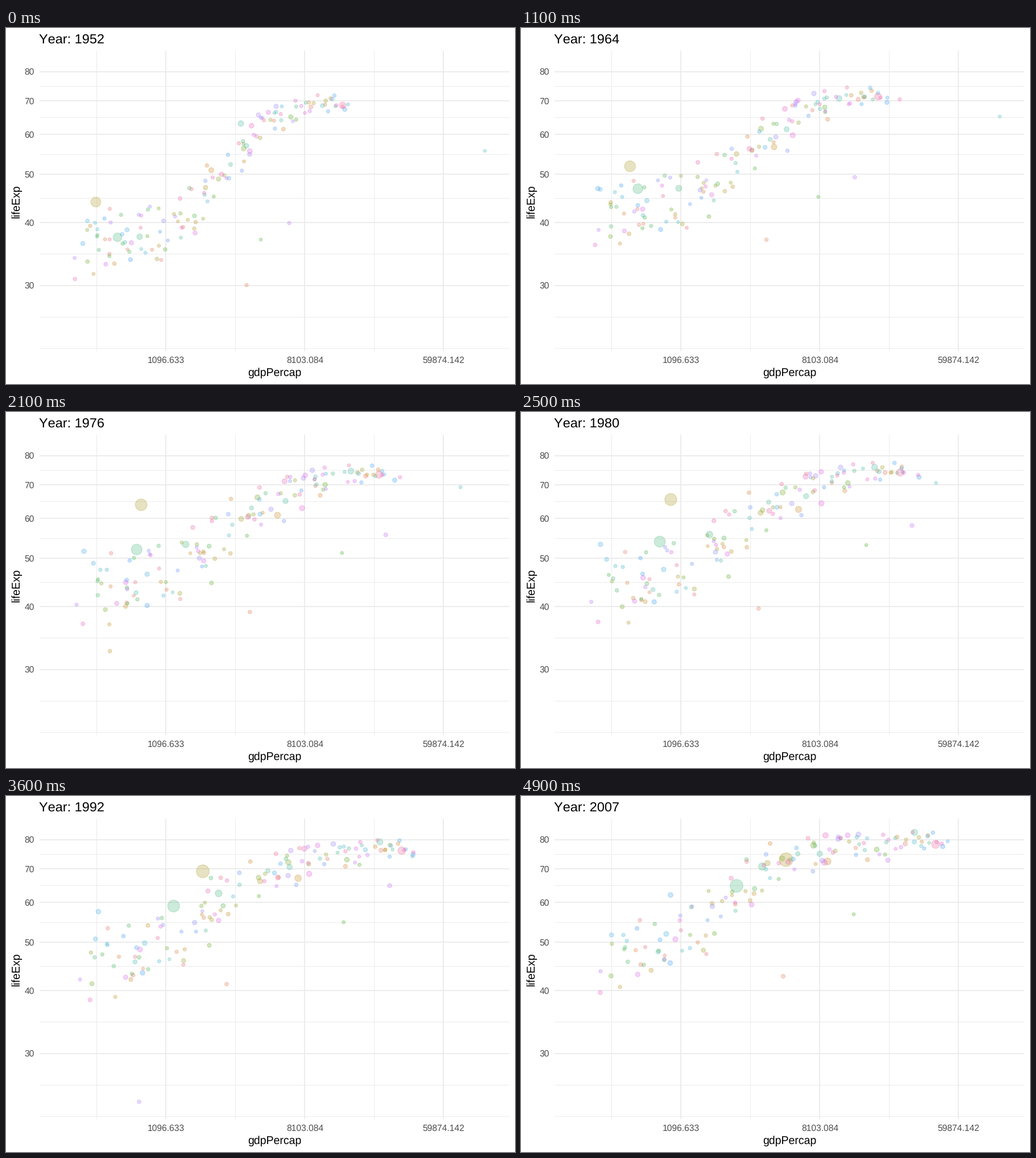
A matplotlib script for the animation above (5 s loop, 895 by 626 pixels).

```python
import numpy as np
import matplotlib.pyplot as plt
from matplotlib.animation import FuncAnimation

W, H, DPI = 895, 626, 128
FRAMES, INTERVAL = 50, 100
COUNTRIES = 142
MAX_POP = 1318.7  # millions

plt.rcParams.update({
    "font.family": "Liberation Sans",
    "text.hinting": "none",
    "text.kerning_factor": 6,
})
rng = np.random.default_rng(2007)

# Twelve surveys; the dots move linearly from one to the next
SURVEYS = np.round(np.linspace(0, FRAMES - 1, 12))
T = SURVEYS / (FRAMES - 1)


def tween(values):
    return np.interp(np.arange(FRAMES), SURVEYS, values)


def lerp(a, b, t):
    return a + (b - a) * t


def hcl(hue, chroma=100, light=65):
    """Polar LUV colour, as shown on a wide-gamut screen."""
    u = chroma * np.cos(np.radians(hue)) / (13 * light) + 0.19784
    v = chroma * np.sin(np.radians(hue)) / (13 * light) + 0.46834
    y = ((light + 16) / 116) ** 3
    x = 9 * y * u / (4 * v)
    z = 3 * y / v - 5 * y - x / 3
    r, g, b = np.clip([
        3.2405 * x - 1.5371 * y - 0.4985 * z,
        -0.9693 * x + 1.8760 * y + 0.0416 * z,
        0.0556 * x - 0.2040 * y + 1.0572 * z,
    ], 0, 1)
    wide = np.array([0.82 * r + 0.18 * g,
                     0.03 * r + 0.97 * g,
                     0.02 * r + 0.07 * g + 0.91 * b])
    return np.clip(1.055 * wide ** (1 / 2.4) - 0.055, 0, 1)


def marker_area(pop):
    size = 1 + 5 * np.sqrt(np.clip(pop / MAX_POP, 0, 1))
    return (0.75 * (2.845 * size + 0.945)) ** 2


dots = {}  # alphabetical rank -> (x, y, marker area) over all frames


def add_dot(rank, x, y, pops):
    dots[rank] = tween(x), tween(y), tween(marker_area(lerp(*pops, T)))


def journey(rank, pops, start, end, bend=(1, 0.7), detour=(0, 1, 1, 0, 0)):
    """Eased path with an optional detour: peak, rise, fall, dx, dy."""
    peak, rise, fall, dx, dy = detour
    away = np.interp(SURVEYS, (peak - rise, peak, peak + fall), (0, 1, 0))
    add_dot(rank,
            lerp(start[0], end[0], T ** bend[0]) + dx * away,
            lerp(start[1], end[1], T ** bend[1]) + dy * away,
            pops)


# The largest populations
journey(24, (556, 1319), (158, 306), (466, 112), (1.6, 0.36), (9, 9, 4, 10, 100))
journey(58, (372, 1110), (196, 368), (379, 158), (2, 0.6))
journey(134, (157, 301), (592, 136), (729, 85), (0.9, 0.8))
journey(59, (82, 223), (235, 367), (424, 124))
journey(14, (56, 190), (361, 250), (539, 115), (0.5, 0.8))
journey(66, (86, 127), (413, 168), (692, 64), (0.43, 0.57))

# Countries that stray far from the crowd
journey(71, (0.2, 2.5), (842, 216), (741, 88), (4, 0.5), (27, 8, 30, -140, 0))
journey(106, (2.5, 9), (184, 342), (252, 287), detour=(36, 5, 4, 0, 240))
journey(18, (4.7, 14), (148, 348), (336, 189), (2, 0.9), (22, 9, 5, 0, 165))
journey(3, (4, 12), (423, 452), (461, 317), (1, 0.35), (36, 18, 13, -63, 0))
journey(45, (0.4, 1.5), (448, 372), (585, 208), detour=(25, 25, 20, 100, -40))
journey(109, (4, 28), (498, 343), (645, 113), detour=(25, 25, 24, 127, 0))
journey(84, (20, 48), (135, 379), (263, 174), (5, 0.5))


def strata(n, limit):
    """Shuffled, evenly spaced scores."""
    return rng.permutation(np.linspace(-limit, limit, n))


def sway(amount):
    """A small wandering that starts and ends at zero."""
    walk = np.cumsum(rng.normal(0, amount, T.size))
    return walk - lerp(walk[0], walk[-1], T)


def falloff(wealth, middle, steepness):
    return 1 / (1 + np.exp((wealth - middle) * steepness))


# The crowd: richer countries start higher, poorer ones climb further
crowd = rng.permutation([r for r in range(COUNTRIES) if r not in dots])
health = strata(crowd.size, 1.7)
for rank, wealth, luck in zip(crowd, np.linspace(0, 1, crowd.size), health):
    first_y = 125 + 255 * falloff(wealth, 0.56, 9)
    last_y = 75 + 60 * (1 - wealth) + 150 * falloff(wealth, 0.36, 14)
    spread = 8 + 30 * (1 - wealth)
    x = lerp(125 + 465 * wealth, 140 + 600 * wealth, T ** 0.75)
    x = x + rng.normal(0, 12) + sway(9)
    y = lerp(first_y, last_y, T ** (0.4 + 0.6 * wealth))
    y = y + luck * spread + sway(0.1 * spread)
    pop = min(3.5 * np.exp(rng.normal(0, 1.2)), 45)
    add_dot(rank, x, y, (pop, pop * (2.9 - 1.5 * wealth)))

ranks = sorted(dots)
xs, ys, areas = (np.array([dots[r][k] for r in ranks]) for k in range(3))
colors = [(*hcl(15 + 360 * r / COUNTRIES), 0.3) for r in ranks]

fig = plt.figure(figsize=(W / DPI, H / DPI), dpi=DPI, facecolor="white")
ax = fig.add_axes([0, 0, 1, 1])
ax.set(xlim=(0, W), ylim=(H, 0))
ax.axis("off")

LEFT, RIGHT, TOP, BOTTOM = 59, 885, 40, 568


def x_of(log_gdp):
    return 281.5 + 122 * (log_gdp - 7)


def y_of(years):
    return 76.5 + 383.35 * np.log(80 / years)


def grid(x_lines, y_lines, pixels):
    style = dict(colors="#EBEBEB", linewidths=pixels * 72 / DPI, zorder=1)
    ax.vlines(x_lines, TOP, BOTTOM, **style)
    ax.hlines(y_lines, LEFT, RIGHT, **style)


def label(x, y, text, size, color="black", **kw):
    return ax.text(x, y, text, fontsize=size, color=color, va="baseline", **kw)


x_ticks = np.array([7, 9, 11])
y_ticks = np.arange(30, 90, 10)
y_major = y_of(y_ticks)
y_minor = [*(y_major[1:] + y_major[:-1]) / 2, 507.5, 562.5]
grid(x_of(x_ticks - 1), y_minor, 1)
grid(x_of(x_ticks), y_major, 1.9)

for tick in x_ticks:
    label(x_of(tick), 588.5, f"{np.exp(tick):.3f}", 8.8, "#4D4D4D", ha="center")
for tick in y_ticks:
    label(50, y_of(tick) + 5.7, str(tick), 8.8, "#4D4D4D", ha="right")
label(472, 612, "gdpPercap", 11, ha="center")
label(23.5, 304.5, "lifeExp", 11, ha="center",
      rotation=90, rotation_mode="anchor")
title = label(58.5, 27, "", 13.2)

bubbles = ax.scatter(xs[:, 0], ys[:, 0], s=areas[:, 0], facecolors=colors,
                     edgecolors=colors, linewidths=0.71, zorder=2)


def update(i):
    bubbles.set_offsets(np.column_stack([xs[:, i], ys[:, i]]))
    bubbles.set_sizes(areas[:, i], DPI)
    title.set_text(f"Year: {round(1952 + 55 * i / (FRAMES - 1))}")
    return bubbles, title


anim = FuncAnimation(fig, update, frames=FRAMES, interval=INTERVAL,
                     repeat=True, repeat_delay=0)
plt.show()
```
